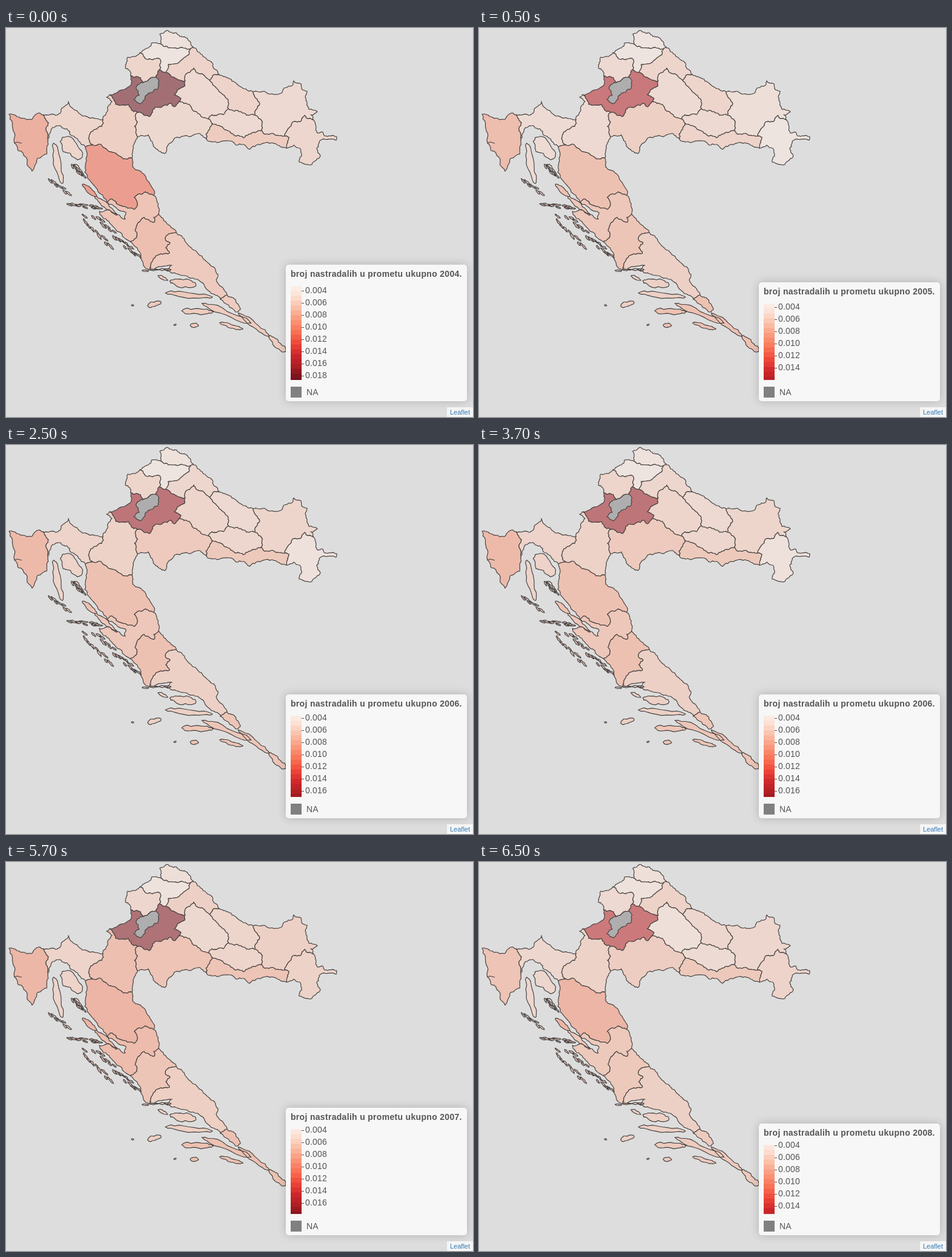
Animation, 771 px wide and 641 px high, one loop 8000 ms. Source, as an HTML page:

```html
<!DOCTYPE html>
<html lang="hr">
<head>
<meta charset="utf-8">
<title>Karta po županijama</title>
<style>
html, body { margin: 0; width: 100%; height: 100%; overflow: hidden; background: #ddd; }
svg { display: block; position: absolute; left: 0; top: 0; }
#map path { stroke: #494544; stroke-width: 1.2; stroke-linejoin: round; }
#legend, #credit { position: absolute; font-family: "Liberation Sans", Arial, sans-serif; }
#legend { left: 462px; width: 299px; background: #f7f7f7; border-radius: 5px; box-shadow: 0 0 15px rgba(0,0,0,.2); }
text { font: 14px "Liberation Sans", Arial, sans-serif; letter-spacing: .2px; fill: #555; }
#title { font-weight: bold; letter-spacing: .31px; }
#credit { left: 728px; top: 625px; width: 43px; height: 16px; background: #f5f5f5; color: #337ab7; font-size: 11px; line-height: 16px; text-indent: 5px; }
</style>
</head>
<body>
<svg id="map" width="771" height="641"></svg>
<div id="legend"></div>
<svg id="key" width="771" height="641"></svg>
<div id="credit">Leaflet</div>
<script>
const NS = 'http://www.w3.org/2000/svg';
const $ = id => document.getElementById(id);

// Key points of each shared border; roughen() adds the fine detail
const arcs = {
  medN: '256,27 254,10 265,4 281,8 287,14 297,16 309,31 305,34',
  medS: '256,27 272,33 293,33 305,34',
  varN: '221,41 235,33 240,25 256,27',
  varS: '221,41 231,51 254,51 253,69',
  varZag: '253,69 264,73',
  varKop: '305,34 302,44 279,59 268,60 264,73',
  kraW: '221,41 214,47 201,48 197,66 204,70 206,79',
  kraZag: '206,79 222,82 227,90 237,84 247,81 253,69',
  kopZag: '264,73 284,85 296,87',
  kopE: '305,34 313,33 316,39 336,54 345,68 352,77',
  kopBje: '296,87 297,76 310,66 314,73 327,78 336,86',
  kopVir: '352,77 341,79 336,86',
  bjeVir: '336,86 352,105 367,119 367,133',
  bjePoz: '367,133 359,143 340,143 334,150',
  bjeSis: '285,122 303,126 307,134 334,150',
  bjeZag: '296,87 295,96 283,102 278,110 289,116 285,122',
  zagW: '206,79 207,90 202,97 171,110',
  zagKar: '171,110 181,126 202,126 211,138 218,139',
  zagSis: '218,139 228,144 237,146 246,131 272,124 278,130 285,122',
  virN: '352,77 371,84 383,94 408,105',
  virOsi: '408,105 419,125 411,144',
  virPoz: '367,133 388,138 397,144 411,144',
  osiPoz: '411,144 423,154 422,169',
  osiN: '408,105 426,104 437,109 453,108 459,99 474,93 475,87 487,92 488,100 497,104 494,114 500,134 514,138 503,143 508,152',
  osiVuk: '508,152 493,144 488,152 473,155 460,178',
  osiBrod: '422,169 425,174 437,174 460,178',
  vukE: '508,152 514,173 521,171 526,178 546,179 545,185 521,184 513,199 519,210 505,225 484,221 488,207 485,198 475,193 463,198',
  vukBrod: '460,178 467,180 463,198',
  pozBrod: '422,169 401,175 392,181 376,176 357,163 340,157',
  pozSis: '334,150 340,157',
  sisBrod: '340,157 330,175 331,183',
  brodS: '331,183 341,188 370,186 380,193 391,192 402,200 413,193 439,189 463,198',
  sisS: '217,179 235,176 242,190 253,203 262,207 269,191 279,181 308,177 317,174 331,183',
  sisKar: '218,139 213,145 217,155 212,162 217,179',
  karW: '171,110 166,114 175,121 168,130 166,139 160,151',
  karPri: '160,151 158,162 140,171 138,186 144,193',
  karLik: '144,193 157,192 194,216 208,214',
  karE: '217,179 211,192 208,214',
  priN: '61,143 82,144 91,137 103,121 107,130 126,145 160,151',
  priLik: '144,193 131,196',
  priS: '131,196 108,177 100,166 87,161 77,164 69,186',
  istPri: '61,143 70,156 66,164 69,186',
  istW: '61,143 54,140 44,149 31,149 5,142 14,173 13,185 20,202 28,206 43,236 52,215 67,208 69,186',
  likE: '208,214 209,229 229,242 244,267 244,276',
  likZad: '244,276 230,270 212,279 217,290 212,299 183,290 172,282 167,287',
  likW: '131,196 134,207 130,238 145,259 167,287',
  zadE: '244,276 249,284 252,307',
  zadSib: '252,307 244,312 245,320 228,312 215,328 216,343 205,352',
  zadW: '167,287 198,304 197,315 169,299 154,302 161,314 181,332 205,352',
  sibE: '252,307 271,326 281,337',
  sibSpl: '281,337 269,339 263,347 271,354 264,362 270,371 247,376 239,391',
  sibW: '205,352 222,371 229,394 236,399 239,391',
  splE: '281,337 294,347 319,374 346,398 350,406 347,415 365,440',
  splDub: '365,440 354,447',
  splW: '239,391 239,398 274,391 264,399 287,407 316,414 337,435 354,447',
  dubE: '365,440 378,447 387,464 379,468 354,447',
  cityE: '247,81 252,86 251,100 235,107 222,125',
  cityW: '222,125 211,118 220,111 215,97 227,90 237,84 247,81'
};

// Border chain, and the yearly rate as a percentage of the colour scale
const areas = {
  med: ['medN -medS', '10 7 10 13 12'],
  vara: ['varN medS varKop -varZag -varS', '6 6 6 8 10'],
  kra: ['varS -kraZag -kraW', '19 16 19 18 16'],
  zag: ['kraZag varZag kopZag bjeZag -zagSis -zagKar -zagW', '100 82 89 95 80'],
  kop: ['kopE kopVir -kopBje -kopZag -varKop', '20 19 18 22 21'],
  bje: ['kopBje bjeVir bjePoz -bjeSis -bjeZag', '16 15 19 17 11'],
  vir: ['virN virOsi -virPoz -bjeVir -kopVir', '20 19 16 19 18'],
  osi: ['osiN osiVuk -osiBrod -osiPoz -virOsi', '16 13 19 22 18'],
  vuk: ['vukE -vukBrod -osiVuk', '18 6 10 21 20'],
  poz: ['virPoz osiPoz pozBrod -pozSis -bjePoz', '16 16 18 19 15'],
  brod: ['osiBrod vukBrod -brodS -sisBrod -pozBrod', '25 20 27 30 27'],
  sis: ['zagSis bjeSis pozSis sisBrod -sisS -sisKar', '17 23 26 30 24'],
  kar: ['zagKar sisKar karE -karLik -karPri -karW', '23 16 21 33 21'],
  pri: ['priN karPri priLik priS -istPri', '19 15 20 20 18'],
  ist: ['istPri -istW', '42 34 36 38 30'],
  lik: ['karLik likE likZad -likW -priLik', '53 32 32 39 39'],
  zad: ['zadE zadSib -zadW -likZad', '30 28 28 35 27'],
  sib: ['sibE sibSpl -sibW -zadSib', '33 29 32 29 27'],
  spl: ['splE splDub -splW -sibSpl', '26 22 22 23 22'],
  dub: ['dubE -splDub', '25 32 29 32 26']
};

// Islands as ovals: x, y, length, width, angle
const isles = {
  pri: [[108, 198, 46, 22, 48], [86, 223, 68, 11, 78], [120, 234, 24, 8, 52]],
  lik: [[138, 268, 32, 7, 42]],
  zad: [[165, 293, 48, 8, 40], [148, 296, 11, 5, 0]],
  spl: [[292, 420, 44, 14, 8], [259, 412, 18, 5, 25], [302, 440, 78, 8, 5], [245, 455, 23, 8, -15], [209, 457, 4, 2, 10]],
  dub: [[364, 470, 88, 9, 22], [316, 467, 52, 10, 2], [311, 490, 14, 6, 5], [372, 491, 40, 6, 15],
    [409, 489, 64, 9, 37], [448, 520, 38, 11, 44], [279, 489, 4, 2, -20]]
};

// Rows of islets: x1, y1, x2, y2, count
const rows = {
  pri: [[75, 250, 103, 273, 7], [112, 226, 126, 246, 5]],
  zad: [[107, 289, 152, 297, 8], [128, 312, 172, 360, 9], [146, 311, 178, 336, 7]],
  sib: [[181, 344, 216, 375, 9]],
  spl: [[231, 399, 267, 398, 4]]
};

const noise = (x, y) => { const n = Math.sin(x * 12.99 + y * 78.23) * 43758.5; return n - Math.floor(n) - .5; };
const parse = s => s.split(' ').map(p => p.split(',').map(Number));
const closed = pts => 'M' + pts.map(p => p.map(v => v.toFixed(1)).join(' ')).join('L') + 'Z';

// Midpoint displacement gives the borders their ragged look
function roughen(pts, passes = 3) {
  for (let k = 0; k < passes; k++) {
    pts = pts.flatMap((p, i) => {
      if (!i) return [p];
      const [x, y] = pts[i - 1], dx = p[0] - x, dy = p[1] - y, len = Math.hypot(dx, dy);
      if (len < 3.5) return [p];
      const off = noise(x + p[0], y + p[1]) * Math.min(.42, 3.5 / len);
      return [[(x + p[0]) / 2 - dy * off, (y + p[1]) / 2 + dx * off], p];
    });
  }
  return pts;
}

function oval(x, y, len, width, deg) {
  const a = deg * Math.PI / 180, c = Math.cos(a), s = Math.sin(a), n = len > 20 ? 14 : 8, pts = [];
  for (let k = 0; k < n; k++) {
    const q = k / n * 2 * Math.PI, u = Math.cos(q) * len / 2;
    const v = Math.sin(q) * width * (.5 + .35 * noise(x + k, y));
    pts.push([x + u * c - v * s, y + u * s + v * c]);
  }
  return closed(roughen([...pts, pts[0]], 1));
}

function islets(x1, y1, x2, y2, n) {
  const dir = Math.atan2(y2 - y1, x2 - x1) * 180 / Math.PI;
  let d = '';
  for (let k = 0; k < n; k++) {
    const f = k / (n - 1), r = noise(x1 + k, y2), q = noise(y1, x2 + k);
    d += oval(x1 + (x2 - x1) * f - 5 * r, y1 + (y2 - y1) * f + 5 * r, 12 + 9 * q, 2.6, dir + 25 * r);
  }
  return d;
}

const rough = {};
for (const n in arcs) rough[n] = roughen(parse(arcs[n]));
const chain = names => closed(names.split(' ').flatMap(n => n[0] === '-' ? rough[n.slice(1)].slice().reverse() : rough[n]));

// Colour scale, t from 0 to 1
const reds = 'fff5f0 fee0d2 fcbba1 fc9272 fb6a4a ef3b2c cb181d a50f15 67000d'.split(' ')
  .map(h => [0, 2, 4].map(i => parseInt(h.slice(i, i + 2), 16)));

function ramp(t, alpha) {
  const p = Math.max(0, Math.min(1, t)) * 8, i = Math.min(7, Math.floor(p));
  const mix = reds[i].map((v, k) => Math.round((v + (reds[i + 1][k] - v) * (p - i)) * alpha + 221 * (1 - alpha)));
  return `rgb(${mix})`;
}

function add(parent, tag, attrs, txt) {
  const el = document.createElementNS(NS, tag);
  for (const k in attrs) el.setAttribute(k, attrs[k]);
  if (txt) el.textContent = txt;
  parent.appendChild(el);
  return el;
}
const bar = (x, y, width, height, fill) => add($('key'), 'rect', { x, y, width, height, fill });

const shapes = Object.entries(areas).map(([id, [names, rates]]) => {
  const d = chain(names) + (isles[id] || []).map(p => oval(...p)).join('') + (rows[id] || []).map(p => islets(...p)).join('');
  return { el: add($('map'), 'path', { d }), rates: rates.split(' ') };
});
add($('map'), 'path', { d: chain('cityE cityW'), fill: '#aeaeae' });
add($('map'), 'path', { d: 'M14 189L19 188L26 190', fill: 'none' });

// Start time, top of the legend box, height of its first tick
const years = [
  { at: 0, top: 390, tick: 433 },
  { at: 500, top: 419, tick: 460 },
  { at: 2500, top: 411, tick: 450 },
  { at: 4500, top: 405, tick: 442 },
  { at: 6500, top: 431, tick: 467 }
];
const base = 579.5, band = 8;

function show(i) {
  const { top, tick } = years[i];
  for (const s of shapes) s.el.setAttribute('fill', ramp(s.rates[i] / 100, .5));
  $('legend').style.top = top + 'px';
  $('legend').style.height = 615 - top + 'px';
  $('key').textContent = '';
  add($('key'), 'text', { id: 'title', x: 470, y: top + 20 }, `broj nastradalih u prometu ukupno ${2004 + i}.`);
  for (let y = top + 35.5; y < base; y += band) {
    const rate = .004 + (y + band / 2 - tick) / 1e4;
    bar(470, y, 18, base - y, ramp((rate - .003) / .0155, .93));
  }
  for (let y = tick, k = 0; y < base; y += 20, k++) {
    bar(488, y, 4, 1, '#555');
    add($('key'), 'text', { x: 494, y: y + 4 }, (.004 + k * .002).toFixed(3));
  }
  bar(470, 591, 18, 18, '#808080');
  add($('key'), 'text', { x: 496, y: 605 }, 'NA');
}

const loop = 8000, t0 = performance.now();
let current = -1;
function tick() {
  const t = (performance.now() - t0) % loop;
  const i = years.filter(y => y.at <= t).length - 1;
  if (i !== current) show(current = i);
  requestAnimationFrame(tick);
}
tick();
</script>
</body>
</html>
```
